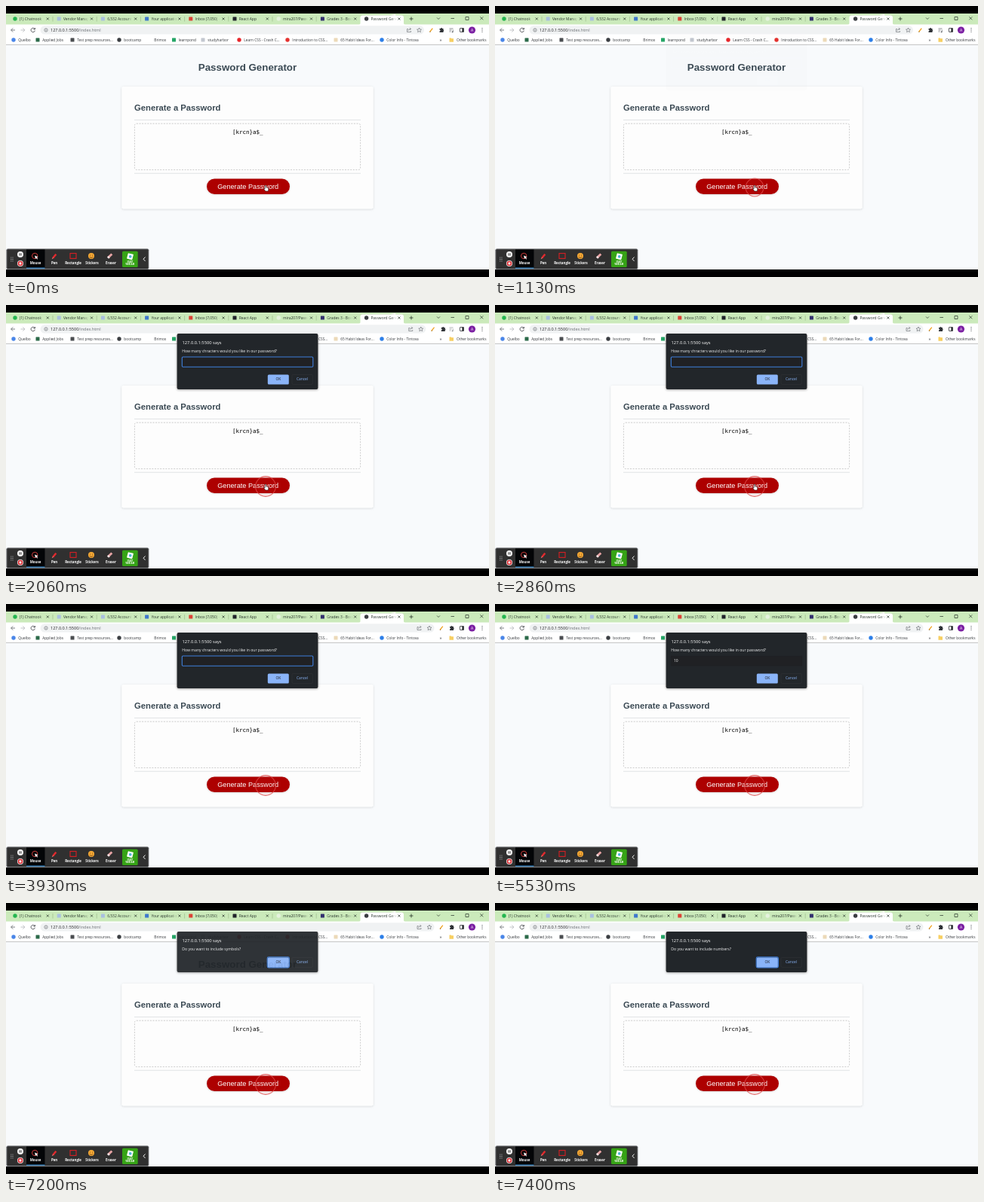
Write an HTML page that moves like this. It is 640 px wide and 360 px high and loops after 8000 ms.

```html
<!DOCTYPE html>
<html lang="en">
<head>
<meta charset="utf-8">
<title>Password Generator</title>
<style>
  html, body { margin: 0; width: 100%; height: 100%; overflow: hidden; background: #000; }
  #stage { display: block; width: 100vw; height: 100vh; }
  text { font-family: "Open Sans", "Noto Sans", sans-serif; white-space: pre; }
  .page { font-family: "Liberation Sans", Arial, sans-serif; }
  .mono { font-family: "DejaVu Sans Mono", "Noto Sans Mono", monospace; }
</style>
</head>
<body>
<svg id="stage" viewBox="0 0 640 360"></svg>
<script>
const LOOP = 8000;
const STRIP = '#cbeabb', INK = '#3b4a54', GREY = '#5f6368', BLUE = '#8ab4f8', FOCUS = '#3f7fdc', PANEL = '#24272a';

// Markup helpers; text is placed by its vertical centre.
const text = (x, y, size, str, fill = '#35383c', extra = '') =>
  `<text x="${x}" y="${y + size * .36}" font-size="${size}" fill="${fill}" ${extra}>${str}</text>`;
const rect = (x, y, w, h, fill, r = 0, extra = '') =>
  `<rect x="${x}" y="${y}" width="${w}" height="${h}" rx="${r}" fill="${fill}" ${extra}/>`;
const circle = (x, y, r, fill, extra = '') => `<circle cx="${x}" cy="${y}" r="${r}" fill="${fill}" ${extra}/>`;
const line = (d, stroke = GREY, width = .8, extra = '') =>
  `<path d="${d}" fill="none" stroke="${stroke}" stroke-width="${width}" ${extra}/>`;
const group = (id, body, extra = '') => `<g id="${id}" ${extra}>${body}</g>`;
const icon = (x, y, color, round) => round ? circle(x, y, 2.7, color) : rect(x - 2.5, y - 2.5, 5, 5, color, .5);
const middle = 'text-anchor="middle"';

function tabStrip() {
  const tabs = [
    ['(1) Chatnook', '#25b650', 1], ['Vendor Manager', '#a9c0e0', 0], ['6,532 Account M', '#a9c0e0', 0],
    ['Your applications', '#3f78cc', 0], ['Inbox (7,050) -', '#dc4336', 0], ['React App', '#20232a', 0],
    ['mira207/Password', '#e4f2de', 1], ['Grades 3 - Bootc', '#33306f', 0], ['Password Generator', '#3b3e42', 1]
  ];
  let out = rect(0, 10, 640, 15, STRIP);
  out += `<path d="M467 25q2.500 0 2.500-2.500v-7q0-3 3-3h51.500q3 0 3 3v7q0 2.500 2.500 2.500z" fill="#fff"/>`;
  tabs.forEach(([title, color, round], i) => {
    const x = 4 + i * 58.2, active = i === tabs.length - 1;
    out += icon(x + 8, 17, color, round);
    out += `<svg x="${x + 13.8}" y="11" width="33" height="13">${text(0, 5.8, 4.95, title, '#26332a')}`
      + rect(26, 0, 7, 13, `url(#${active ? 'fadeWhite' : 'fadeStrip'})`) + '</svg>';
    out += line(`M${x + 49.8} 15.500l3 3m0-3l-3 3`, '#26332a', .75);
    if (i < 7) out += line(`M${x + 58} 14v6.500`, '#8aa97b', .5);
  });
  out += line('M534.500 17h5m-2.500-2.500v5', '#26332a', .8);
  out += line('M571 15.500l2 2 2-2M589.500 16.500h4.500M609 14.500h4v4h-4zM628.300 14.300l4 4m0-4l-4 4', '#26332a', .7);
  return out;
}

function toolbar() {
  let out = rect(0, 24.500, 640, 27, '#fff');
  out += line('M12 32H6.700m2.500-2.600L6.600 32l2.600 2.600', GREY, .8);
  out += line('M19.500 32h5.300m-2.500-2.600l2.600 2.600-2.600 2.600', '#b4b7ba', .8);
  out += line('M37.800 30.200a2.700 2.700 0 1 0 .6 2.500M38.400 29v2h-2', '#44474b', .9);
  out += '<rect id="omnibox" x="45.500" y="26.300" height="11.300" rx="5.600" fill="#f0f2f3"/>';
  out += circle(53, 32, 2.2, 'none', `stroke="${GREY}" stroke-width=".6"`) + line('M53 31.700v1.600M53 30.500v.6', GREY, .7);
  out += text(59, 31.600, 5.500, '127.0.0.1:5500<tspan fill="#6b7075">/index.html</tspan>', '#202124');
  out += group('actions',
    line('M533 30.500h-1.500v4h5v-1.500M532.800 33q.3-2.500 3.500-2.500m-1.300-1.600l1.600 1.600-1.600 1.500', GREY, .6) +
    line('M547.500 29l.9 2 2.100.2-1.600 1.400.5 2.100-1.900-1.100-1.900 1.100.5-2.100-1.600-1.400 2.100-.2z', GREY, .6) +
    line('M561.500 34.500l3.800-4.800', '#efa323', 1.3) + line('M561.500 34.500l1-.3', '#6a5530', .8) +
    `<path d="M574.500 30h1.500a1 1 0 0 1 2 0h1.500v1.700a1 1 0 0 1 0 1.900v1.400h-5v-1.500a1 1 0 0 0 0-2z" fill="#2f3236"/>`);
  out += group('media', line('M587.500 30h5M587.500 32h3M587.500 34h2M592.300 31.500v3', GREY, .7) + circle(591.6, 34.400, .9, GREY));
  out += rect(601.5, 29.500, 5, 5, 'none', .4, 'stroke="#2f3236" stroke-width=".8"') + rect(604.300, 29.500, 2.200, 5, '#2f3236');
  out += circle(617.5, 32, 4.600, '#7b1fa2') + text(617.5, 31.800, 5, 'A', '#fff', middle);
  out += [29.7, 32, 34.3].map(y => circle(631, y, .65, GREY)).join('');

  const bookmarks = [
    [10, 'Quelbo', '#4a86e8', 1], [42, 'Applied Jobs', '#2c6a4a', 0], [88, 'Test prep resources...', '#4a4d50', 0],
    [150, 'bootcamp', '#3b3e42', 1], [190, 'Brimox', '#fff', 1], [222.5, 'learnpond', '#26a667', 0],
    [261, 'studyharbor', '#c3c8d0', 0], [309, 'Learn CSS - Crash C...', '#e8262b', 1],
    [373, 'Introduction to CSS...', '#e5322f', 1], [437, '65 Habit Ideas For...', '#ecd9b8', 0],
    [498, 'Color Info - Tintova', '#2d7fe8', 1]
  ];
  for (const [x, label, color, round] of bookmarks)
    out += icon(x, 45, color, round) + text(x + 6.3, 44.800, 4.800, label);
  out += text(574.5, 44.600, 6, '»') + '<path d="M587.500 42.500h2.200l.7.800h2.600v4.400h-5.500z" fill="#f7cf62"/>';
  out += text(597, 44.800, 4.800, 'Other bookmarks');
  return out + rect(0, 51.300, 640, .5, '#eceeef');
}

function page() {
  const bold = 'class="page" font-weight="700"';
  let out = rect(0, 51.800, 640, 298.2, '#f8fafc');
  out += text(320, 81.100, 13.333, 'Password Generator', INK, `${bold} ${middle}`);
  out += rect(153.3, 107, 333.4, 162.3, '#fdfdfd', 2, 'filter="url(#cardShadow)"');
  out += text(170, 134.600, 11.250, 'Generate a Password', INK, bold);
  out += rect(170, 150.900, 300, .8, '#dadde0') + rect(170, 221.800, 300, .8, '#dadde0');
  out += rect(170.4, 156.200, 299.2, 61.4, '#fdfdfd', 2.5, 'stroke="#c4c4c4" stroke-width=".85" stroke-dasharray="2 1.600"');
  out += text(320.2, 167.300, 7.500, '[krcn}a$_', '#000', `class="mono" ${middle}`);
  out += rect(266, 229.500, 110, 20.500, '#ad0003', 10.25, 'filter="url(#buttonShadow)"');
  return out + text(320.7, 239.300, 9.167, 'Generate Password', '#fff', `class="page" ${middle}`);
}

function recorderBar() {
  let out = rect(.8, 322.800, 188.2, 26.700, '#303030', 1.5, 'stroke="#8b8d90" stroke-width=".9"');
  out += rect(27, 323.500, 24.500, 25.300, '#030507') + rect(27, 347.500, 24.500, 1.300, '#3f8fd0');
  for (let i = 0; i < 6; i++) out += circle(6.8 + i % 2 * 2.2, 334 + (i >> 1) * 2.4, .6, '#b9bbbe');
  out += circle(19, 330, 4, '#f4f4f4') + line('M18 328.400v3.200m2-3.200v3.200', '#222', .9);
  out += circle(19, 342, 4, '#f4f4f4') + circle(19, 342, 3.300, '#dc2f35') + rect(17.6, 340.600, 2.8, 2.800, '#fff', .3);
  [['Mouse', 39], ['Pen', 64], ['Rectangle', 89], ['Stickers', 114], ['Eraser', 139]].forEach(([label, x]) =>
    out += text(x, 341, 4.400, label, '#fff', `${middle} font-weight="700"`));
  out += circle(38.2, 332, 3.700, 'none', 'stroke="#e3413f" stroke-width=".9"');
  out += '<path d="M38.200 331.500l4.500 2-1.900.6 1.400 1.800-.8.600-1.400-1.800-1.100 1.400z" fill="#fff"/>';
  out += line('M62 335l4.300-5.200', '#e2292d', 2.5) + line('M61.300 335.700l1.100-1.300', '#f6b1ac', 1);
  out += rect(85, 328.600, 8, 6.800, 'none', 0, 'stroke="#d81f24" stroke-width="1.100"');
  out += circle(113, 332, 4, '#f6a935') + line('M110.800 333a2.400 2.400 0 0 0 4.400 0', '#714414', .8);
  out += circle(111.5, 331, .55, '#714414') + circle(114.5, 331, .55, '#714414');
  out += line('M135.600 334l4.700-4.500', '#e8a4a5', 3) + line('M135 334.700l1.600-1.600', '#f8e4e4', 3);
  out += rect(154, 325.800, 20.700, 21.200, '#36a316', 1.5);
  out += rect(160.8, 329, 7.400, 7.600, '#fff', .8, 'transform="rotate(14 164.500 332.800)"') + circle(164.7, 332.800, 1.900, '#4fb4d8');
  out += text(164.3, 340, 2.6, 'START', '#fff', `${middle} font-weight="700"`);
  out += text(164.3, 343.200, 2.6, 'WEBCAM', '#fff', `${middle} font-weight="700"`);
  return out + line('M184.500 333.500l-2.500 2.700 2.500 2.700', '#f1f1f1', 1);
}

function dialog(height, message, messageId, okFocused) {
  const top = height + 18.4;
  let out = rect(226.6, 38, 186.800, height, PANEL, 2, 'filter="url(#dialogShadow)"');
  out += text(233.5, 49.500, 5.750, '127.0.0.1:5500 says', '#fff');
  out += text(233.3, 61.300, 5.100, message, '#f1f2f3', `id="${messageId}"`);
  if (okFocused) out += rect(346.2, top - .5, 29.200, 14, PANEL, 1.8, `stroke="${FOCUS}" stroke-width="1.100"`);
  out += rect(346.8, top, 28, 13, BLUE, 1.5) + text(360.8, top + 6.300, 4.900, 'OK', '#202124', middle);
  out += rect(379, top, 27.300, 13, 'none', 1.5, 'stroke="#34373a" stroke-width=".5"');
  return out + text(392.5, top + 6.300, 4.900, 'Cancel', BLUE, middle);
}

const shadow = (id, dy, blur, alpha) =>
  `<filter id="${id}" x="-20%" y="-30%" width="140%" height="170%"><feDropShadow dx="0" dy="${dy}" stdDeviation="${blur}" flood-opacity="${alpha}"/></filter>`;
const fade = (id, color) =>
  `<linearGradient id="${id}"><stop stop-color="${color}" stop-opacity="0"/><stop offset="1" stop-color="${color}"/></linearGradient>`;

const stage = document.getElementById('stage');
stage.innerHTML =
  `<defs>${shadow('cardShadow', .8, 1.7, .15)}${shadow('buttonShadow', .4, .9, .2)}${shadow('dialogShadow', .8, 1.5, .4)}`
  + fade('fadeStrip', STRIP) + fade('fadeWhite', '#fff') + '</defs>'
  + rect(0, 0, 640, 360, '#000') + tabStrip() + toolbar() + page() + recorderBar()
  + circle(344, 241, 0, 'rgba(225,60,60,.08)', 'id="ring" stroke="#dd4a4a" stroke-opacity=".8" stroke-width="1.100"')
  + group('hand', '<path d="M343.200 238.600q.8-.9 1.500 0v2.500l2.300.5q1 .3.900 1.300l-.5 3h-3.600l-2.100-2.900q.1-1 1.500-.2z" fill="#fff" stroke="#111" stroke-width=".55"/>')
  + group('prompt', dialog(74, 'How many chracters would you like in our password?', 'question', false)
    + rect(233.3, 69, 173.500, 13.200, '#202124', 1.2, 'id="field"')
    + text(237, 75.300, 5, '', '#f1f2f3', 'id="typed"')
    + rect(236.8, 72.300, .5, 6.600, '#e8eaed', 0, 'id="caret"'))
  + group('confirm', dialog(54, '', 'confirmText', true));

const $ = id => document.getElementById(id);
const set = (id, attributes) => {
  for (const name in attributes) $(id).setAttribute(name, attributes[name]);
};
const ramp = (t, from, to) => Math.min(1, Math.max(0, (t - from) / (to - from)));
const smooth = p => p * p * (3 - 2 * p);

function draw(t) {
  // The media button leaves the toolbar and the address bar widens.
  const slide = smooth(ramp(t, 1860, 2640));
  set('omnibox', { width: 508.5 + 13.5 * slide });
  set('actions', { transform: `translate(${13.5 * slide})` });
  set('media', { opacity: 1 - ramp(slide, 0, .5) });

  const grow = ramp(t, 990, 1200);
  set('ring', { r: 13.4 * (1 - (1 - grow) ** 2), opacity: grow > 0 ? 1 : 0 });
  set('hand', { opacity: t < 3800 ? 1 : 0 });

  set('prompt', { opacity: ramp(t, 1130, 1330) * (1 - ramp(t, 5600, 5700)) });
  const focused = t < 5525;
  set('field', { stroke: focused ? FOCUS : '#202124', 'stroke-width': focused ? 1.1 : .3 });
  const value = t < 4725 ? '' : t < 4795 ? '1' : '10';
  $('typed').textContent = value;
  const blinkStart = value === '' ? 1260 : value === '1' ? 4725 : 4795;
  const caretOn = focused && Math.floor((t - blinkStart) / 533) % 2 === 0;
  set('caret', { x: 236.8 + value.length * 2.86, opacity: caretOn ? 1 : 0 });

  const swap = 1 - ramp(t, 7195, 7290) + ramp(t, 7300, 7395);
  set('confirm', { opacity: ramp(t, 5690, 5850) * swap });
  $('confirmText').textContent = `Do you want to include ${t < 7295 ? 'symbols' : 'numbers'}?`;
}

const start = performance.now();
function tick() {
  draw((performance.now() - start) % LOOP);
  requestAnimationFrame(tick);
}
tick();
</script>
</body>
</html>
```
